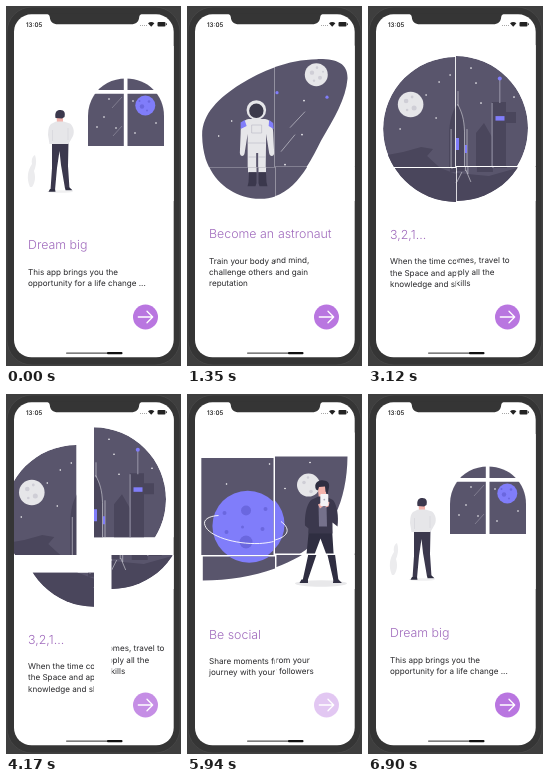
Recreate the animation shown at these times as an HTML page. Size 175 by 360 pixels, loop 7.17 s.

```html
<!DOCTYPE html>
<html lang="en">
<head>
<meta charset="utf-8">
<title>Onboarding</title>
<style>
html, body { margin: 0; width: 100%; height: 100%; overflow: hidden; background: #3e3e3e; }
svg { display: block; width: 175px; height: 360px; }
text { font-family: Inter, Roboto, sans-serif; text-rendering: geometricPrecision; }
.title { font-size: 12.4px; font-weight: 300; fill: #a06bbd; }
.body { font-size: 8.1px; fill: #28282b; }
.night { fill: #59556c; }
.hill { fill: #4a465c; }
.dark { fill: #3b384d; }
.black { fill: #2f2e41; }
.pale { fill: #e6e6e9; }
.grey { fill: #cfced6; }
.blue { fill: #807dfa; }
.crater { fill: #6a67df; }
.skin { fill: #f3b3ac; }
.star { fill: #fff; }
.line { fill: none; stroke: #d9d8e0; stroke-width: .6; }
.ring { fill: none; stroke: #fff; stroke-width: .9; }
</style>
</head>
<body>
<svg viewBox="0 0 175 360" xmlns="http://www.w3.org/2000/svg">
  <defs>
    <clipPath id="screen"><rect x="8" y="8.300" width="159.700" height="343" rx="17.500"/></clipPath>
    <clipPath id="q0"><rect width="88" height="161"/></clipPath>
    <clipPath id="q1"><rect x="88" width="87" height="161"/></clipPath>
    <clipPath id="q2"><rect x="88" y="161" width="87" height="199"/></clipPath>
    <clipPath id="q3"><rect y="161" width="88" height="199"/></clipPath>
    <clipPath id="disc"><circle cx="88" cy="123" r="72"/></clipPath>

    <g id="page0">
      <rect x="8" y="40" width="160" height="155" fill="#fff"/>
      <path class="night" d="M82 140V110C82 89 98 72.500 120 72.500S158 89 158 110V140Z"/>
      <circle class="blue" cx="139.300" cy="99.500" r="10"/>
      <g class="crater">
        <circle cx="136" cy="100.500" r="2.200"/><circle cx="143" cy="95.500" r="1.300"/>
        <circle cx="141" cy="104.500" r="1"/><circle cx="133.500" cy="95" r="1"/>
      </g>
      <path class="line" d="M106 102l10-11M107 130l9-10" opacity=".5"/>
      <path fill="#fff" d="M80 84h80v3.800h-80zM117.800 71h3.700v70h-3.700z"/>
      <g id="stars0"></g>
      <path fill="#ececee" d="M24 181C20 172 22 164 26 158C25 153 27 150 29 149C31 155 30 160 28 165C30 171 29 177 26 181Z"/>
      <ellipse cx="54" cy="185.500" rx="13" ry="1.300" fill="#f0f0f1"/>
      <path class="skin" d="M50.500 108h6.500v9h-6z"/>
      <path class="dark" d="M49.500 112C48.500 106 51 103.800 54.500 104C58.500 104 59.500 107 58.500 111L56 112.500Z"/>
      <path class="dark" d="M46 136H62.500L62 160L63.500 182.500H59L55 159L53.500 145L51 162L49 184H44.500L46 162Z"/>
      <path class="black" d="M44 183h5l.500 2.700h-7zM59 181.500h4.500l3 2.700h-7z"/>
      <path class="pale" d="M50 115.500L45 118C42 121 42.500 125 42 129L43.500 138H62.500L67 130C69 125 67 120 64 117.500L57.500 115.500Z"/>
      <path fill="none" stroke="#cfcfd5" stroke-width=".5" d="M46.500 124V135M62 122V134"/>
      <text class="title" x="22" y="243.300">Dream big</text>
      <g class="body"><text x="22" y="268.800">This app brings you the</text><text x="22" y="280">opportunity for a life change ...</text></g>
    </g>

    <g id="page1">
      <rect x="8" y="40" width="160" height="155" fill="#fff"/>
      <path class="night" d="M15.500 130C15 108 32 92 54 78C76 64 102 54 130 53.500C150 53 161 58 160.500 73C159 93 147 113 134 135C120 163 104 193 73 192.500C48 192 27 177 19 153C17 146 15.600 138 15.500 130Z"/>
      <circle class="pale" cx="129.300" cy="69" r="11.500"/>
      <g class="grey">
        <circle cx="125" cy="67" r="2.200"/><circle cx="133" cy="72" r="2"/>
        <circle cx="130" cy="62" r="1.300"/><circle cx="127" cy="75" r="1.200"/><circle cx="136" cy="66" r="1"/>
      </g>
      <path class="line" d="M103 122l15-16M94 146l14-17"/>
      <g id="stars1"></g>
      <path class="pale" d="M62 113C56 114 54 119 54 127L53.200 147C53.500 151 57.500 151 58 147L61 128V166H69.500V147H71.500V166H79L79.500 128L82.500 147C83 151 87.500 151 87.500 147L86.500 126C86 118 84 114 78.500 113Z"/>
      <circle class="pale" cx="69.700" cy="104" r="9.800"/>
      <circle cx="69.700" cy="104.800" r="7.200" fill="#3c3a4b"/>
      <path class="blue" d="M54 116.500l4-2.500 2 6-6 3zM82.500 114l4 3 .500 6-5-3z"/>
      <path fill="none" stroke="#b7b5c3" stroke-width=".6" d="M61 137h18M62 151h7.500M71.500 151h7.500M65 119h10v8h-10z"/>
      <path class="dark" d="M62 166h7.500V177L68.500 180H60.500L61.500 176ZM71.500 166H79L79.500 176L80.500 180H72.500L71.500 177Z"/>
      <text class="title" x="22" y="232">Become an astronaut</text>
      <g class="body"><text x="22" y="257.400">Train your body and mind,</text><text x="22" y="268.800">challenge others and gain</text><text x="22" y="280">reputation</text></g>
    </g>

    <g id="page2">
      <rect x="8" y="40" width="160" height="155" fill="#fff"/>
      <g clip-path="url(#disc)">
        <circle class="night" cx="88" cy="123" r="72"/>
        <path class="hill" d="M14 150L36 146L54 141L66 143L60 150L72 161L88 167L120 170L162 158V196H14Z"/>
        <circle class="pale" cx="43.500" cy="98.500" r="12.800"/>
        <g class="grey">
          <circle cx="39" cy="95" r="2.300"/><circle cx="47" cy="102" r="2.500"/>
          <circle cx="45" cy="91" r="1.400"/><circle cx="40" cy="104" r="1.300"/>
        </g>
        <path class="hill" d="M124 97h14v65h-14zM138 107h10v11h-10zM108 128l8-10 8 14v34h-16z"/>
        <path fill="#8f8c9f" d="M123.500 98h1.200v64h-1.200zM131.200 75h1.200v23h-1.200z"/>
        <circle class="blue" cx="131.800" cy="73.500" r="2"/>
        <rect class="blue" x="127.500" y="111" width="9" height="4.500"/>
        <path class="hill" d="M82 165V125C83 110 87 103 89.500 99C93 105 96 112 96.500 125V165Z"/>
        <path class="line" d="M90 86V101M89.500 99C94 107 96 114 96.500 126V165M84 123V162M99 124V168M93 166l-5 10M97 164l5 12"/>
        <path class="blue" d="M88 133h3v12h-3zM97 140h2v8h-2z"/>
        <g id="stars2"></g>
      </g>
      <text class="title" x="22" y="232">3,2,1...</text>
      <g class="body"><text x="22" y="257.400">When the time comes, travel to</text><text x="22" y="268.800">the Space and apply all the</text><text x="22" y="280">knowledge and skills</text></g>
    </g>

    <g id="page3">
      <rect x="8" y="40" width="160" height="155" fill="#fff"/>
      <path class="night" d="M15.800 64H160.500C160 110 143 145 110 163C83 178 50 185 15.800 185Z"/>
      <circle class="blue" cx="62.200" cy="132" r="35.300"/>
      <g class="crater">
        <circle cx="60.500" cy="116.500" r="5"/><circle cx="60.500" cy="148" r="6.500"/><circle cx="41" cy="138" r="2"/>
        <circle cx="77" cy="135" r="2"/><circle cx="39" cy="119" r="2"/><circle cx="80" cy="115" r="2"/><circle cx="57" cy="133" r="1.500"/>
      </g>
      <path class="ring" d="M33 121.500C23 122 17 126 19.500 131.500C23 142 49 150.500 74 149.500C92 148.500 103 143 99.500 135C98 132 96 130.500 94 129"/>
      <circle class="pale" cx="121.500" cy="92.500" r="11.500"/>
      <g class="grey"><circle cx="117" cy="90" r="1.800"/><circle cx="124" cy="99" r="1.800"/><circle cx="121" cy="85" r="1.200"/></g>
      <g id="stars3"></g>
      <ellipse cx="132.500" cy="189.500" rx="26" ry="3.200" fill="#e8e8ea"/>
      <path class="black" d="M122 136H145L146.500 160L150 186.500H145L139 161L133.500 146L127.500 162L119 187H114L119.500 162Z"/>
      <path class="black" d="M113 185.500h6.500v3.500h-8.500zM145 185.500h5l3.500 3.500h-9z"/>
      <path class="skin" d="M130.500 92.500H139V101L137.500 107H132Z"/>
      <path class="black" d="M129 97C126.500 91 131 87.500 135 87.800C140 88 143 90 142 95L140.500 102L138.500 99L138 94L132 94.500L131 98Z"/>
      <path class="dark" d="M131.500 104L124 107.500C119 113 117.500 124 118 133L121.500 136V141H145.500L145.500 130L150.500 134C152 124 150 112 146 107.500L139 104Z"/>
      <path fill="#75718b" d="M131.500 112h8l.500 22h-8z"/>
      <path class="skin" d="M131 112l4-2 2 3-4 3zM139.500 108l3 2-1 4-3 1z"/>
      <rect x="133.300" y="101.500" width="8" height="12" rx="1" fill="#f3f3f6"/>
      <circle cx="137.300" cy="107" r=".9" fill="#aaa8b8"/>
      <text class="title" x="22" y="243.300">Be social</text>
      <g class="body"><text x="22" y="268.800">Share moments from your</text><text x="22" y="280">journey with your followers</text></g>
    </g>
  </defs>

  <rect x="1" y="1" width="173" height="358" rx="25" fill="#353535" stroke="#484848" stroke-width=".8"/>
  <rect x="8" y="8.300" width="159.700" height="343" rx="17.500" fill="#fff"/>
  <g clip-path="url(#screen)"><g id="leaving"></g><g id="arriving"></g></g>

  <path fill="#353535" d="M40 7.500C42.500 8 43.500 9 43.800 11C44.200 16 47 18.300 52 18.300H125C130 18.300 132.800 16 133.200 11C133.500 9 134.500 8 137 7.500Z"/>
  <text x="20" y="20.500" font-size="6.300" font-weight="500" fill="#111">13:05</text>
  <g fill="#222">
    <path d="M134 19h1v1h-1zM136 19h1v1h-1zM138 19h1v1h-1zM140 19h1v1h-1z" opacity=".4"/>
    <path d="M142 17.300Q145.200 14.500 148.400 17.300L145.200 20.700Z"/>
    <rect x="151.500" y="16" width="8" height="4.400" rx="1"/><rect x="160" y="17.300" width=".8" height="1.800"/>
  </g>
  <rect x="60" y="346.500" width="56" height="1.200" rx=".6" fill="#555"/>
  <rect x="101" y="346" width="15.500" height="2.200" rx="1" fill="#111"/>
  <g id="button">
    <circle cx="139.500" cy="311" r="12.500" fill="#b976e0"/>
    <path d="M132.300 311H146.500M141 305.300L146.700 311L141 316.700" fill="none" stroke="#fff" stroke-width="1.300" stroke-linecap="round" stroke-linejoin="round"/>
  </g>
</svg>
<script>
const LOOP = 7170, MOVE = 920, REACH = 212;
const PRESS = 430, RELEASE = 240, DIM = 0.22;
const starts = [458, 2244, 3985, 5886];
const dirs = [[-1, 0], [0, -1], [1, 0], [0, 1]];
const NS = 'http://www.w3.org/2000/svg';
const $ = id => document.getElementById(id);

function add(parent, tag, attrs) {
  const el = document.createElementNS(NS, tag);
  for (const key in attrs) el.setAttribute(key, attrs[key]);
  return parent.appendChild(el);
}

// White stars first, then blue ones
const stars = [
  [[[103, 93], [91, 121], [98, 111], [150, 117], [129, 127], [110, 122], [127, 95]], []],
  [[[117, 95], [32, 130], [45, 115], [115, 129], [98, 159]], [[90, 87], [140, 91.5]]],
  [[[72, 76], [59, 89], [83, 69], [69, 112], [108, 78], [113, 98], [146, 92], [103, 63], [33, 123]], []],
  [[[41, 90], [84, 70], [98, 96], [123, 70]], []]
];
stars.forEach((groups, page) => groups.forEach((list, blue) => list.forEach(([cx, cy]) =>
  add($('stars' + page), 'circle', { cx, cy, r: blue ? 1.6 : 0.8, class: blue ? 'blue' : 'star' }))));

function makeLayer(id) {
  const pieces = dirs.map((dir, i) => {
    const group = add($(id), 'g', {});
    return { group, dir, use: add(group, 'use', { 'clip-path': `url(#q${i})` }) };
  });
  let shown = -1;
  return (page, shift) => {
    $(id).style.display = shift < REACH ? '' : 'none';
    for (const { group, dir, use } of pieces) {
      if (page !== shown) use.setAttribute('href', '#page' + page);
      group.setAttribute('transform', `translate(${dir[0] * shift} ${dir[1] * shift})`);
    }
    shown = page;
  };
}
const leaving = makeLayer('leaving'), arriving = makeLayer('arriving');

// Cubic ease-in-out with control points (.42, 0) and (.58, 1)
function ease(x) {
  if (x <= 0) return 0;
  if (x >= 1) return 1;
  let lo = 0, hi = 1;
  for (let i = 0; i < 24; i++) {
    const s = (lo + hi) / 2, r = 1 - s;
    if (1.26 * r * r * s + 1.74 * r * s * s + s * s * s < x) lo = s; else hi = s;
  }
  return lo * lo * (3 - 2 * lo);
}

function buttonOpacity(t) {
  for (const start of starts) {
    const dt = t - start;
    if (dt > -PRESS && dt <= 0) return 1 - (1 - DIM) * ease(1 + dt / PRESS);
    if (dt > 0 && dt < RELEASE) return DIM + (1 - DIM) * dt / RELEASE;
  }
  return 1;
}

function draw(now) {
  const t = now % LOOP;
  const step = Math.max(0, starts.filter(s => s <= t).length - 1);
  const p = ease((t - starts[step]) / MOVE);
  leaving(step, REACH * p);
  arriving((step + 1) % 4, REACH * (1 - p));
  $('button').setAttribute('opacity', buttonOpacity(t));
}

const origin = performance.now();
function tick() {
  draw(performance.now() - origin);
  requestAnimationFrame(tick);
}
tick();
</script>
</body>
</html>
```
